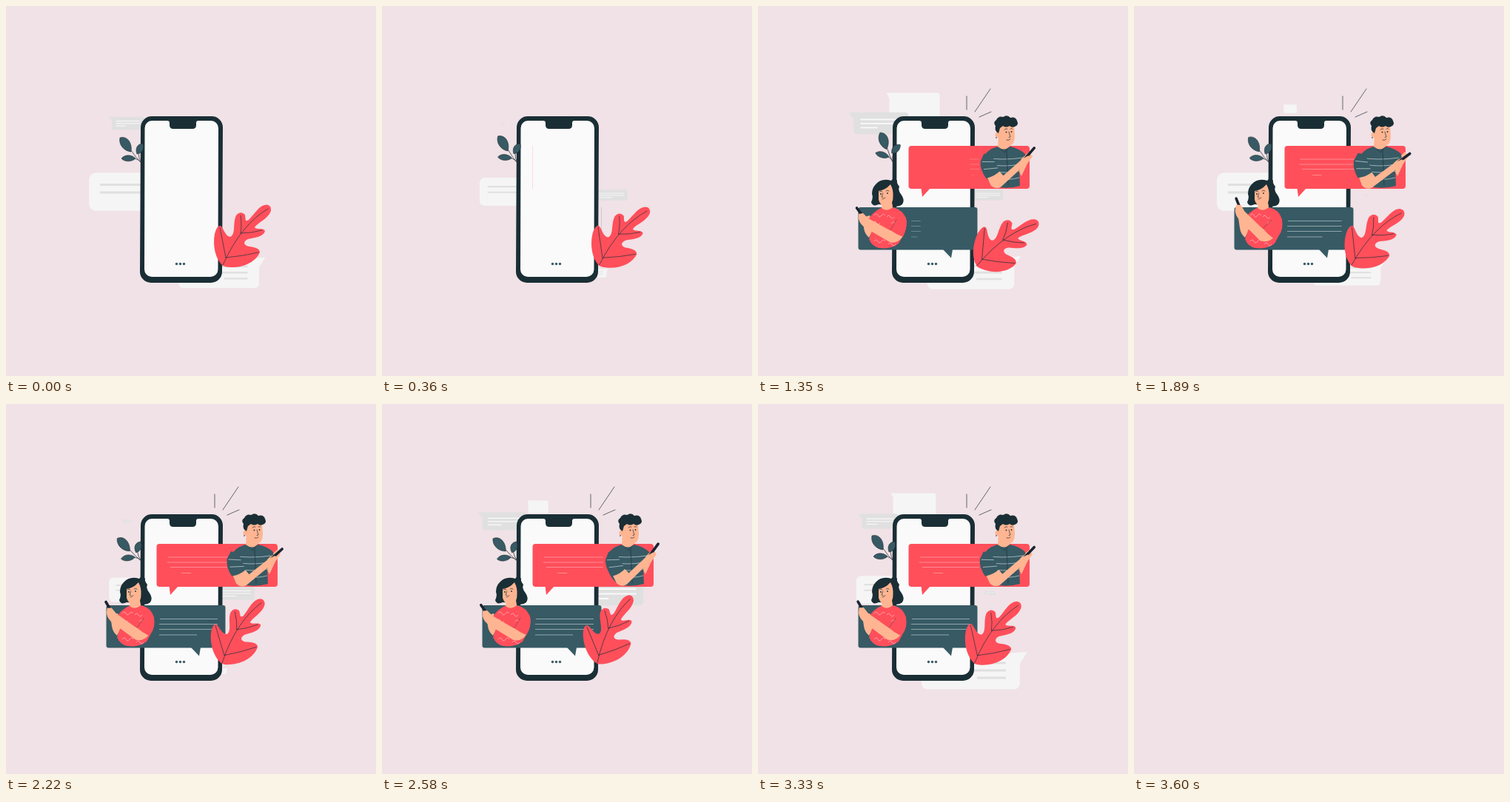
These frames come from a looping animation (500x500 px, 3.63 s). An HTML page:

```html
<!DOCTYPE html>
<html lang="en">
<head>
<meta charset="utf-8">
<title>Chat</title>
<style>
  html, body { margin: 0; height: 100%; overflow: hidden; background: #f0e2e6; }
  svg { display: block; width: 100%; height: 100%; }
  .dark { fill: #1a2e35; }
  .teal { fill: #375a64; }
  .red { fill: #ff4f5b; }
  .skin { fill: #ffb591; }
  .pale { fill: #f5f5f5; }
  .grey { fill: #e0e0e0; }
  .line { fill: none; stroke: #263238; stroke-width: .7; stroke-linecap: round; }
  .onGrey { fill: none; stroke: #fafafa; stroke-width: 2; }
  .onPale { fill: none; stroke: #e0e0e0; stroke-width: 3; }
  .trim { fill: none; stroke: #c9d5d8; stroke-width: .7; }
  .device { stroke: #1b2430; stroke-width: 3.6; stroke-linecap: round; }
</style>
</head>
<body>
<svg viewBox="0 0 500 500">
  <g id="scene">
    <!-- pulsing bubbles, drawn around their own centres -->
    <g id="top" class="pale">
      <rect x="-34" y="-22" width="69" height="44" rx="4"/><path d="M-38-22h10l-6 7z"/>
    </g>
    <g id="topLeft" class="grey">
      <rect x="-40" y="-17.5" width="88" height="35" rx="6"/><path d="M-48-17.5h16l-8 11z"/>
      <path class="onGrey" d="M-29-6h65M-29 .5h65M-29 7h27"/>
    </g>
    <g id="left" class="pale">
      <rect x="-76" y="-26" width="152" height="52" rx="10"/>
      <path class="onPale" d="M-61-9.5h101M-61 1h101"/>
    </g>
    <g id="right" class="grey">
      <rect x="-60" y="-17" width="99" height="34" rx="6"/>
      <path class="onGrey" d="M-50-5.5h79M-50 1h79M-50 7.5h41"/>
    </g>
    <g id="bottom" class="pale">
      <rect x="-67" y="-24" width="133" height="48.500" rx="8"/><path d="M76-26L50-24 66-10z"/>
      <path class="onPale" d="M-50-11h97M-50-1h97M8 9h39"/>
    </g>

    <path id="rays" class="line" d="M282 122v18M314 112l-21 31M299 150l16-7"/>

    <path class="dark" d="M197 149H278A15 15 0 0 1 293 164L292 359A15 15 0 0 1 277 374H196A15 15 0 0 1 181 359L182 164A15 15 0 0 1 197 149Z"/>
    <path fill="#fafafa" d="M197 155H218Q221 155 221 158V161Q221 166 226 166H252Q257 166 257 161V158Q257 155 260 155H277A10 10 0 0 1 287 165L286.500 356A10 10 0 0 1 276.500 366H197A10 10 0 0 1 187 356L187.500 165A10 10 0 0 1 197 155Z"/>
    <g class="teal"><circle cx="230.500" cy="348.500" r="1.700"/><circle cx="235.500" cy="348.500" r="1.700"/><circle cx="240.500" cy="348.500" r="1.700"/></g>

    <g id="sprig">
      <path class="line" d="M169 195Q176 206 183 212M174 206Q179 207 183 212M179 199Q179 206 183 212"/>
      <g class="teal" stroke="#263238" stroke-width=".6">
        <path d="M154 178C163 175 171 184 169 197C159 196 152 187 154 178Z"/>
        <path d="M156 206C161 200 170 201 175 206C170 211 160 211 156 206Z"/>
        <path d="M177 200C174 192 178 186 185 186C187 193 184 199 177 200Z"/>
      </g>
    </g>

    <g id="redBubble" class="red">
      <rect x="203.500" y="189" width="163.500" height="58" rx="4"/><path d="M220.500 246L222 258 233 246z"/>
    </g>
    <g id="tealBubble" class="teal">
      <rect x="135.500" y="272" width="161" height="57.500" rx="3"/><path d="M250 329L261 340.500 263 329z"/>
    </g>
    <path id="redText" fill="none" stroke="#ff8c93" stroke-width="1" d="M299 207H219M299 214H218M299 220.500H222M250 228.500H237"/>
    <path id="tealText" fill="none" stroke="#91a7ad" stroke-width="1" d="M208 290.500H286M207 297.500H286M207 304.500H286M207 312H258"/>

    <g id="man">
      <path class="skin" d="M352 222L358 205 366 197 371 203 364 213 356 230Z"/>
      <path class="teal" d="M324 190Q334 196 341 190Q354 193 361 200L362 208 353 222 354 243Q337 248 320 244Q304 233 304 212Q304 195 324 190Z"/>
      <path class="trim" d="M306 205Q330 209 358 205M311 214Q332 218 354 214M315 223Q334 227 353 223M323 233Q338 236 353 232"/>
      <path class="line" d="M336 195L338 242M325 190l8 8 7-8"/>
      <path class="skin" d="M325 174L324 190Q332 197 340 190L338 182Z"/>
      <path class="skin" d="M325 161Q336 154 346 162L347 175Q347 188 339 189Q328 187 325 178Q319 178 321 172Q323 169 325 171Z"/>
      <path class="dark" d="M325 172Q319 169 321 162Q317 157 322 154Q325 148 331 150Q337 146 341 151Q348 149 350 155Q353 161 347 163Q343 165 340 162Q335 165 331 162L327 165Z"/>
      <path class="line" d="M333 167q2-2 4-1M341 166q2-1 3 0M339 170l2 7-2 .5M336 181q3 1 5-1"/>
      <circle class="dark" cx="335.500" cy="170.500" r=".9"/><circle class="dark" cx="342.500" cy="170" r=".9"/>
      <circle class="dark" cx="322" cy="178" r=".8"/>
      <g id="manArm">
        <path class="skin" d="M313 231L328 221 335 228 357 206Q360 200 367 197L371 200Q368 209 363 212L333 243Q326 248 319 242Z"/>
        <path id="manPhone" class="device" d="M373 187L362.500 203.500"/>
        <path class="skin" d="M357 205L367 199 370 201 362 210Z"/>
        <path class="teal" d="M307 200Q319 199 322 209L330 222Q323 230 312 233Q303 222 303 211Z"/>
        <path class="trim" d="M305 211l17-1M308 221l19-3"/>
      </g>
    </g>

    <g id="woman">
      <path class="skin" d="M141 286L151 283 157 300 150 313Q144 308 143 300Z"/>
      <path class="red" d="M168 272L182 272Q196 275 200 288Q202 302 196 310L190 321Q180 329 164 327Q154 325 150 315L155 301 148 291Q154 278 168 272Z"/>
      <path fill="none" stroke="#ffa9ae" stroke-width=".9" d="M157 283q3-4 5 0t5 0 4 0M174 285q3-4 5 0t5 0M155 293q3-4 5 0t5 0M180 294q3-4 5 0t5 0M157 318q3-4 5 0t5 0 5 0M176 322q3-4 5 0t5 0"/>
      <path class="dark" d="M159 241Q167 232 180 236Q184 230 188 236Q187 239 191 244Q189 249 193 254Q199 262 195 268Q189 273 181 269L163 268Q155 272 153 265Q156 259 154 254Q154 246 159 241Z"/>
      <path class="skin" d="M168 263L167 273Q174 279 182 272L180 258Z"/>
      <path class="skin" d="M163 250Q172 249 179 241Q183 248 182.500 257Q183 268 175 270.500Q166 272 163 262Z"/>
      <path class="line" d="M164 251q2-2 4 0M173 250q2-2 4 0M169 253l-2 5 2 .5M168 261q3-1 4-2"/>
      <circle class="dark" cx="166" cy="254" r=".9"/><circle class="dark" cx="175" cy="253" r=".9"/>
      <g id="womanArm">
        <path class="device" d="M133.500 273L144 287"/>
        <path class="skin" d="M136 281L142 280 149 287 178 303 190 301 196 311Q189 322 178 319L147 301Q138 296 136 288Z"/>
        <path class="red" d="M188 277Q200 280 201 291Q201 301 196 312Q187 309 179 303L187 290Z"/>
        <path class="line" stroke-opacity=".5" d="M187 289L179 303"/>
      </g>
    </g>

    <g id="leaf">
      <path class="red" d="M293 351C283 342 279 324 282 308Q285 296 290 297C294 300 296 311 303 312C311 309 306 293 311 283Q317 276 323 282C324 289 323 292 328 289C336 281 342 269 352 268.500Q359 269 358 277C354 288 341 292 336 299C338 303 348 299 350 304C348 312 336 313 327 315C319 319 322 324 329 325C337 326 343 328 343 333C338 345 322 354 303 353Q297 353 293 351Z"/>
      <path class="line" d="M293 350Q306 321 322 302Q337 284 354 274M297 340L289 299M317 307Q319 296 317 283M317 307Q332 307 346 303M297 340Q320 338 341 333"/>
    </g>
  </g>
</svg>
<script>
const LOOP = 3630, BLANK = 3600, PULSE = 1800;
const $ = id => document.getElementById(id);
const set = (id, transform) => $(id).setAttribute('transform', transform);
const fade = (id, value) => $(id).setAttribute('opacity', value);
const ease = x => (1 - Math.cos(Math.PI * Math.min(1, Math.max(0, x)))) / 2;
const ramp = (t, from, to) => ease((t - from) / (to - from));
const wave = (t, peak, period) => (1 + Math.cos(2 * Math.PI * (t - peak) / period)) / 2;

// Eased steps through [time, value] pairs, holding the last value
const keys = (t, pairs) => pairs.reduce((v, [time, value], i) =>
  i ? v + (value - pairs[i - 1][1]) * ramp(t, pairs[i - 1][0], time) : value, 0);

const pulse = (id, x, y, k) => set(id, `translate(${x} ${y}) scale(${k})`);
const turn = (id, angle, x, y) => set(id, `rotate(${angle} ${x} ${y})`);
const stretch = (id, x, k) => {
  set(id, `translate(${x} 0) scale(${k} 1) translate(${-x} 0)`);
  fade(id, k > 0 ? 1 : 0);
};

function draw(t) {
  fade('scene', t < BLANK ? 1 : 0);

  pulse('top', 211, 139, t < 395 ? 0 : wave(t, 1295, PULSE));
  pulse('topLeft', 163, 158.5, Math.max(wave(t, 1120, PULSE), 0.5 * (1 - t / 220)));
  pulse('left', 187.5, 251, wave(t, 50, PULSE));
  pulse('right', 315, 255.5, wave(t, 850, PULSE));
  pulse('bottom', 288, 361, wave(t, 1550, PULSE));

  turn('leaf', keys(t, [[0, 0], [1330, 16], [2620, -11.5], [3560, 0]]), 292, 361);
  turn('sprig', keys(t, [[0, 0], [1130, 18.5], [2400, -8], [3300, 0]]), 183, 212);
  fade('rays', ramp(t, 350, 720));

  const grow = ramp(t, 350, 880);
  stretch('redBubble', 203.5, grow);
  stretch('tealBubble', 296.5, grow);

  const typed = ramp(t, 1100, 2050);
  stretch('redText', 299, typed);
  stretch('tealText', 207, typed);

  // Arms swing from the shoulders
  const people = ramp(t, 850, 1150);
  fade('man', people);
  fade('woman', people);
  const lowered = wave(t, 1890, 1900);
  turn('manArm', 9 * lowered, 312, 172);
  turn('manPhone', 12 * lowered, 362, 204);
  turn('womanArm', 15 * wave(t, 1910, 1120), 185, 284);
}

function tick() {
  draw(performance.now() % LOOP);
  requestAnimationFrame(tick);
}
tick();
</script>
</body>
</html>
```
